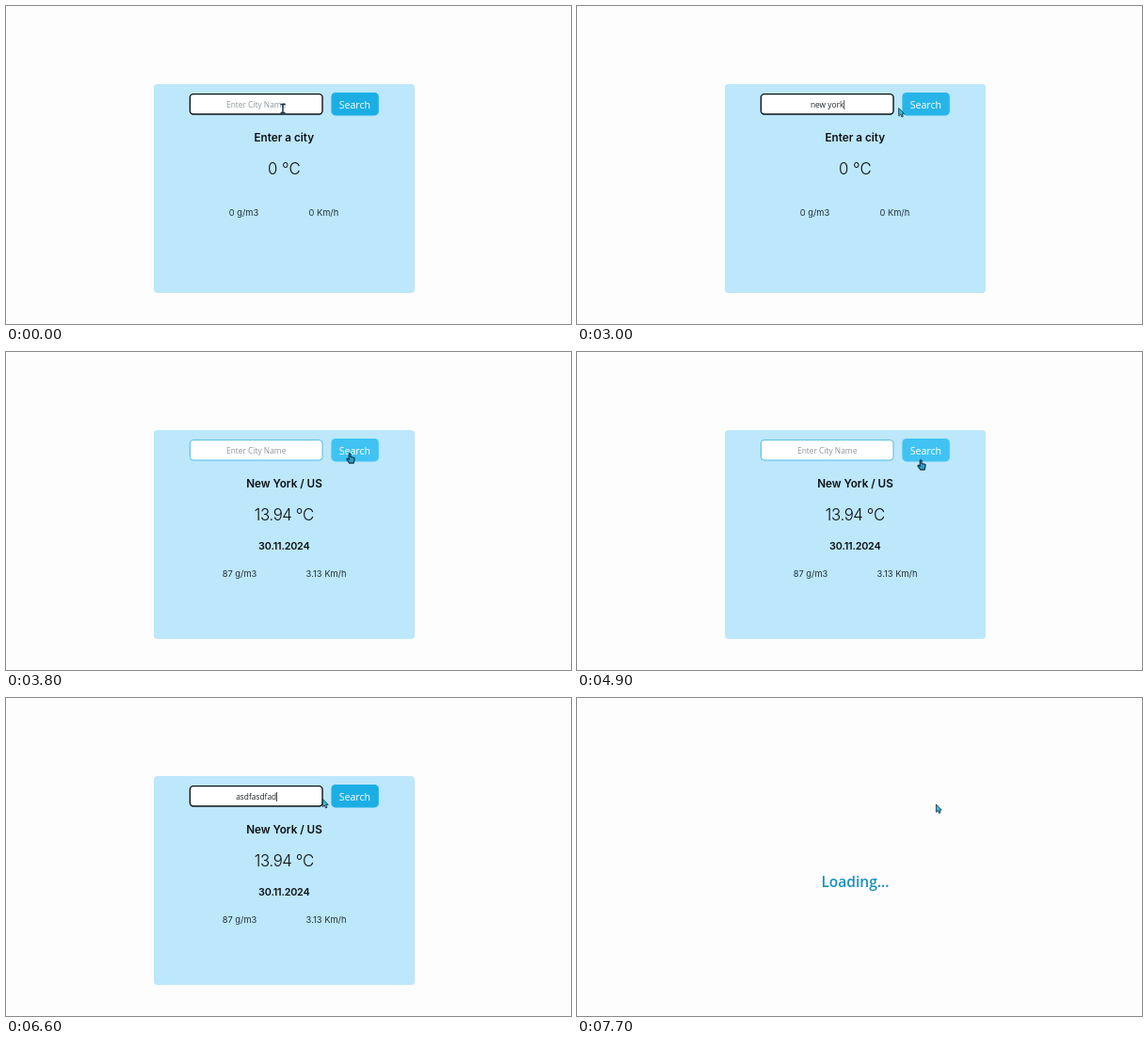
An HTML page that plays this animation: 600 px wide and 338 px high, repeating every 8000 ms.

```html
<!DOCTYPE html>
<html lang="en">
<head>
<meta charset="utf-8">
<title>Weather search</title>
<style>
  html, body { margin: 0; width: 100%; height: 100%; overflow: hidden; background: #fdfdfd; }
  svg { display: block; width: 600px; height: 338px; }
  text { text-anchor: middle; white-space: pre; font-family: "Open Sans", "Noto Sans", sans-serif; }
  .info text { font-family: Inter, Roboto, sans-serif; fill: #0b0f12; }
  .info .bold { font-size: 11.7px; font-weight: 600; }
  .info .date { font-size: 10.8px; font-weight: 600; letter-spacing: -.2px; }
  .info .temp { font-size: 16.8px; font-weight: 300; }
  .info .small { font-size: 9.3px; fill: #22303a; }
  #value { font-size: 8.4px; }
  .label { font-size: 10.6px; fill: #fff; }
  #loading { font-size: 15.5px; font-weight: 600; fill: #1791bf; }
</style>
</head>
<body>
<svg viewBox="0 0 600 338">
  <g id="card">
    <rect x="157" y="83" width="277" height="222" rx="4" fill="#bde7fb"/>
    <rect id="field" x="195.4" y="93.6" width="140.6" height="21.4" rx="3.5" fill="#fff"/>
    <text id="value" x="265.7" y="108"></text>
    <path id="caret" stroke="#222" stroke-width=".8"/>
    <rect id="button" x="345.4" y="92" width="50.4" height="24.4" rx="4.5"/>
    <text class="label" x="370.3" y="108.6">Search</text>
    <g class="info" id="before">
      <text class="bold" x="295.3" y="144">Enter a city</text>
      <text class="temp" x="295.3" y="178.6">0 °C</text>
      <text class="small" x="252.5" y="223.2">0 g/m3</text>
      <text class="small" x="337.3" y="223.2">0 Km/h</text>
    </g>
    <g class="info" id="after">
      <text class="bold" x="295.5" y="144">New York / US</text>
      <text class="temp" x="295.3" y="178.6" letter-spacing="-.4">13.94 °C</text>
      <text class="date" x="295.3" y="210">30.11.2024</text>
      <text class="small" x="248" y="239">87 g/m3</text>
      <text class="small" x="340" y="239">3.13 Km/h</text>
    </g>
  </g>
  <text id="loading" x="295.5" y="200.8">Loading...</text>
  <g id="pointer" stroke-linejoin="round">
    <path id="beam" d="M-2.5-4.5H2.5M0-4.5V4.5M-2.5 4.5H2.5" fill="none" stroke="#12364a" stroke-width="1.5"/>
    <path id="arrow" d="M.4.5V8.8L2.3 7.1 3.6 10 5 9.4 3.8 6.6H6.2Z" fill="#35bfe8" stroke="#15384a" stroke-width=".9"/>
    <path id="hand" d="M-.8.8Q.2-.2 1 .8V4L4.4 4.8Q5.3 5.2 5.1 6.5L4.2 10.6H-.3L-3 7Q-3.2 5.5-1.8 5.8L-.8 6.8Z" fill="#2a9cc4" stroke="#102c3c" stroke-width="1.1"/>
  </g>
</svg>
<script>
  const $ = id => document.getElementById(id);
  const LOOP = 8000, STEP = 100;

  const mouse = [
    [0, 294, 109], [2400, 294, 109], [3300, 365, 107.5], [4800, 365, 107.5],
    [4900, 365, 114.5], [5200, 326, 109], [5500, 309, 103.5], [6300, 309, 103.5],
    [7100, 381, 112.5], [LOOP, 381, 112.5]
  ];
  const hover = [
    [0, 0], [2900, 0], [3200, 1], [4900, 1], [5200, 0],
    [6600, 0], [6900, 1], [LOOP, 1]
  ];
  const first = { text: "new york", keys: [500, 600, 800, 1100, 1200, 1500, 1700, 2000] };
  const second = {
    text: "asdfasdfadfasf",
    keys: Array.from("asdfasdfadfasf", (_, i) => 5800 + Math.floor(i * .9) * STEP)
  };

  function track(frames, t) {
    const i = Math.max(1, frames.findIndex(f => f[0] >= t));
    const [a, b] = [frames[i - 1], frames[i]];
    const k = (t - a[0]) / (b[0] - a[0]);
    return a.slice(1).map((v, j) => v + (b[j + 1] - v) * k);
  }

  const within = (t, from, to) => t >= from && t < to;
  const show = (id, on) => $(id).setAttribute("display", on ? "inline" : "none");
  const set = (id, attrs) => {
    for (const name in attrs) $(id).setAttribute(name, attrs[name]);
  };

  function drawField(t) {
    const focused = t < 3400 || within(t, 5500, 7200);
    const entry = t < 3800 ? first : second;
    const typed = entry.keys.filter(k => k <= t);
    const text = entry.text.slice(0, typed.length);

    set("field", { stroke: focused ? "#0c1216" : "#4dbbe5", "stroke-width": focused ? 1.4 : 1 });
    set("value", { fill: text ? "#20262a" : "#8d959b" });
    $("value").textContent = text || "Enter City Name";

    const idle = t - typed[typed.length - 1];
    const x = 266 + $("value").getComputedTextLength() / 2;
    set("caret", { d: `M${x} 100V110` });
    show("caret", focused && text && idle % 1000 < 500);
  }

  function drawPointer(t, loading) {
    const [x, y] = track(mouse, t);
    const kind = loading ? "arrow" : x >= 346 ? "hand" : x < 336 ? "beam" : "arrow";
    for (const id of ["beam", "arrow", "hand"]) show(id, id === kind);
    set("pointer", { transform: `translate(${x} ${y})` });
  }

  function draw(now) {
    const t = Math.floor(now % LOOP / STEP) * STEP;
    const loading = within(t, 3400, 3800) || t >= 7600;

    show("card", !loading);
    show("loading", loading);
    show("before", t < 3800);
    show("after", t >= 3800);
    drawField(t);

    const [k] = track(hover, t);
    set("button", { fill: `rgb(${27 + 37 * k},${174 + 21 * k},${228 + 14 * k})` });
    drawPointer(t, loading);
  }

  const start = performance.now();
  function tick() {
    draw(performance.now() - start);
    requestAnimationFrame(tick);
  }
  tick();
</script>
</body>
</html>
```
